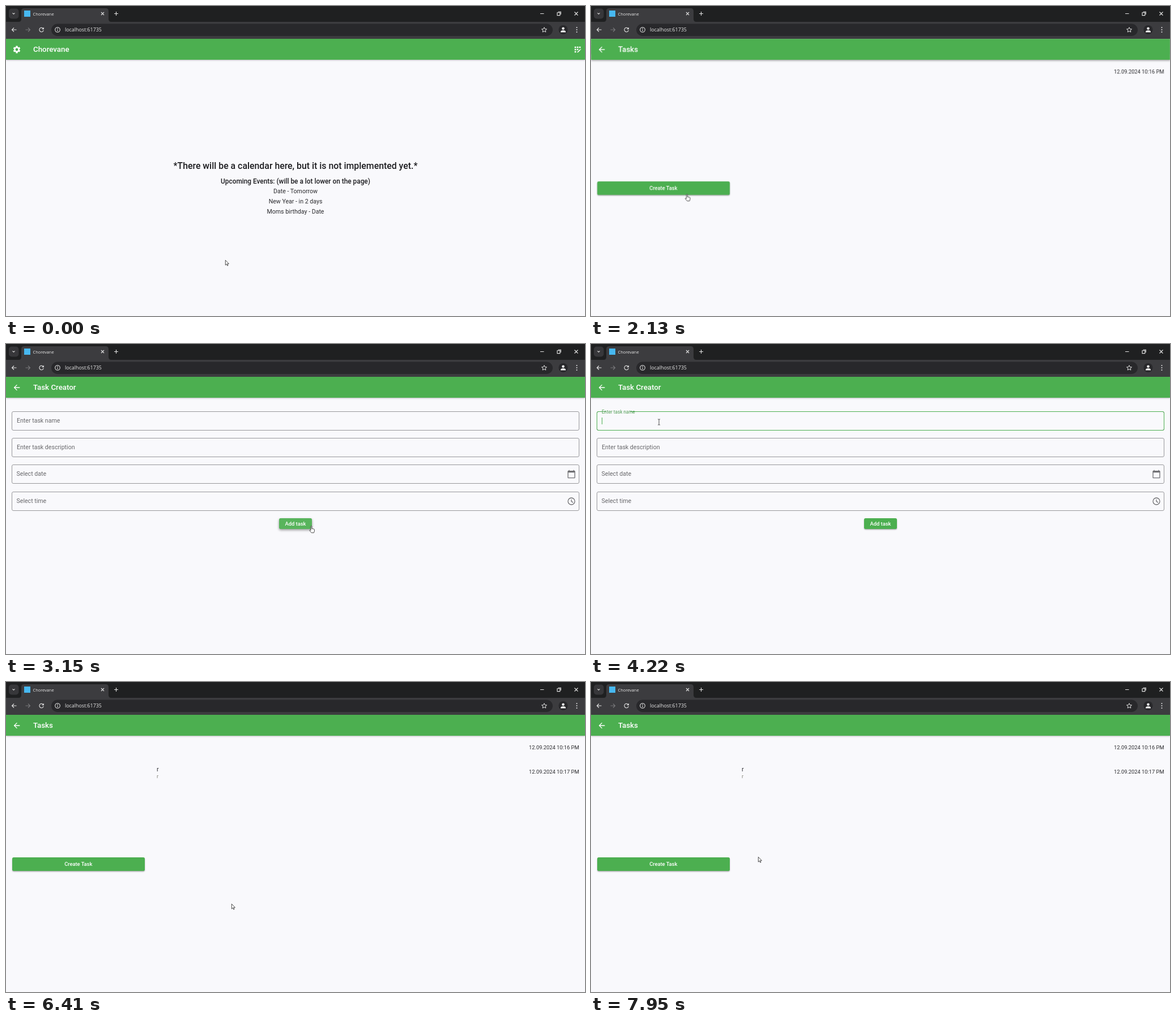
An HTML page for the animation above (7990 ms loop, 1022 by 548 pixels).

```html
<!DOCTYPE html>
<html lang="en">
<head>
<meta charset="utf-8">
<title>Chorevane</title>
<style>
:root { --page: #f9f9fc; --green: #4caf50; }
html, body { margin: 0; width: 100%; height: 100%; overflow: hidden; background: var(--page); }
body { position: relative; font: 10.6px Roboto, sans-serif; color: #2b2b2e; }
body *, .field::after { position: absolute; box-sizing: border-box; margin: 0; white-space: nowrap; }
svg, svg * { position: static; }
svg { position: absolute; overflow: visible; }

/* Every moving part shares one clock */
.move { animation: 7990ms linear infinite both; }
.step { animation: 7990ms step-end infinite both; }

.chrome { left: 0; top: 0; }
.view { left: 0; top: 58px; width: 1022px; height: 490px; overflow: hidden; }
.page, .scrim { inset: 0; }
.page { background: var(--page); }
.scrim { background: #000; opacity: 0; }

header { left: 0; top: 0; width: 100%; height: 37px; overflow: hidden; background: var(--green);
  color: #fff; box-shadow: 0 1.3px 3px #0005; }
header h1 { left: 48px; top: 0; font-size: 13.33px; font-weight: 500; line-height: 37px; }
.icon { width: 16px; height: 16px; fill: currentColor; }
header .icon { top: 11px; }
.lead { left: 10.5px; }
.grid { left: 1000.5px; }
.ripple { left: 985px; top: -4px; width: 46px; height: 46px; border-radius: 50%; background: #fff; }

.line { left: 0; width: 100%; line-height: 20px; text-align: center; }
.big { top: 215px; font-size: 15.85px; font-weight: 500; color: #1d1d20; }
.mid { top: 242px; font-size: 11.85px; font-weight: 500; color: #1d1d20; }
.date { right: 10.5px; font-size: 9.3px; line-height: 14px; }
.button { border-radius: 2.7px; background: var(--green); color: #fff; font-size: 9.33px; font-weight: 500;
  text-align: center; box-shadow: 0 1.3px 2px #0005; }
.create { left: 10.5px; top: 252px; width: 234.5px; height: 24px; line-height: 24px; }
.add { left: 482px; top: 250px; width: 58px; height: 19px; line-height: 19px; }
.note { left: 266px; line-height: 14px; }

.field { left: 10px; width: 1002px; height: 34px; line-height: 34px; }
.field::after { content: ""; inset: 0; border: 1px solid #98989b; border-radius: 3px; }
.focus { inset: 0; z-index: 1; border: 1.6px solid var(--green); border-radius: 3px; }
.notch { left: 6px; top: 0; height: 2px; z-index: 2; background: var(--page); }
.label { left: 8.5px; top: 0; z-index: 3; color: #68686b; transform-origin: 0 50%; }
.typed { left: 8.5px; top: 1px; color: #1d1d20; }
.caret { left: 8.5px; top: 11px; width: 1.3px; height: 12px; background: var(--green); }
.field .icon { left: 980px; top: 9px; color: #707073; }

.cursor { left: 0; top: 0; }
.cursor svg { left: 0; top: 0; fill: #fff; stroke: #222; stroke-width: .8; }

/* Page transitions */
.home { animation-name: home; }
.tasks { animation-name: tasks, tasksFade; }
.maker { animation-name: maker, makerFade; }
.scrim1 { animation-name: scrim1; }
.scrim2 { animation-name: scrim2; }
@keyframes home {
  0%, 15.907% { transform: scale(1); animation-timing-function: cubic-bezier(.05, 0, .1333, .06); }
  16.533% { transform: scale(1.02); animation-timing-function: cubic-bezier(.2083, .82, .25, 1); }
  19.662%, 100% { transform: scale(1.05); }
}
@keyframes tasks {
  0%, 15.907% { transform: scale(.85); animation-timing-function: cubic-bezier(.05, 0, .1333, .06); }
  16.533% { transform: scale(.91); animation-timing-function: cubic-bezier(.2083, .82, .25, 1); }
  19.662% { transform: scale(1); }
  31.79% { transform: scale(1); animation-timing-function: cubic-bezier(.05, 0, .1333, .06); }
  32.416% { transform: scale(1.02); animation-timing-function: cubic-bezier(.2083, .82, .25, 1); }
  35.544%, 72.58% { transform: scale(1.05); }
  72.591% { transform: scale(1.1); animation-timing-function: cubic-bezier(.05, 0, .1333, .06); }
  73.217% { transform: scale(1.06); animation-timing-function: cubic-bezier(.2083, .82, .25, 1); }
  76.345%, 100% { transform: scale(1); }
}
@keyframes tasksFade { 0%, 16.377% { opacity: 0; } 16.846%, 100% { opacity: 1; } }
@keyframes maker {
  0%, 31.79% { transform: scale(.85); animation-timing-function: cubic-bezier(.05, 0, .1333, .06); }
  32.416% { transform: scale(.91); animation-timing-function: cubic-bezier(.2083, .82, .25, 1); }
  35.544% { transform: scale(1); }
  72.591% { transform: scale(1); animation-timing-function: cubic-bezier(.05, 0, .1333, .06); }
  73.217% { transform: scale(.96); animation-timing-function: cubic-bezier(.2083, .82, .25, 1); }
  76.345%, 100% { transform: scale(.9); }
}
@keyframes makerFade {
  0%, 32.259% { opacity: 0; }
  32.728%, 72.901% { opacity: 1; }
  73.37%, 100% { opacity: 0; }
}
@keyframes scrim1 { 0%, 16.687% { opacity: 0; } 17.475%, 19.66% { opacity: .6; } 19.67%, 100% { opacity: 0; } }
@keyframes scrim2 { 0%, 32.569% { opacity: 0; } 33.354%, 35.54% { opacity: .6; } 35.55%, 100% { opacity: 0; } }

/* Buttons and list */
.ripple { animation-name: ripple; }
.add { animation-name: hover; }
.added { animation-name: added; }
@keyframes ripple {
  0%, 12.6% { opacity: 0; transform: scale(.58); }
  13.2%, 14.8% { opacity: .08; transform: scale(.58); }
  16.4%, 100% { opacity: .14; transform: scale(1); }
}
@keyframes hover {
  0%, 38.8%, 43.2%, 67.8%, 100% { background-color: #4caf50; box-shadow: 0 1.3px 2px #0005; }
  39.3%, 42.7%, 68.4%, 74% { background-color: #58b45c; box-shadow: 0 2px 4px #0006; }
}
@keyframes added { 0% { opacity: 0; } 72.5%, 100% { opacity: 1; } }

/* Form entry */
.name .label { animation-name: nameLabel; }
.name .notch { width: 63px; animation-name: nameNotch; }
.name .focus { animation-name: nameFocus; }
.name .typed { animation-name: nameTyped; }
.name .caret { animation-name: nameCaret; }
.info .label { animation-name: infoLabel; }
.info .notch { width: 83px; animation-name: infoNotch; }
.info .focus { animation-name: infoFocus; }
.info .typed { animation-name: infoTyped; }
.info .caret { animation-name: infoCaret; }
@keyframes nameLabel {
  0%, 51.4% { transform: none; color: #68686b; animation-timing-function: cubic-bezier(.4, 0, .2, 1); }
  53.5%, 100% { transform: translateY(-16.5px) scale(.75); color: #4c9f50; }
}
@keyframes infoLabel {
  0%, 59.07% { transform: none; color: #68686b; animation-timing-function: cubic-bezier(.4, 0, .2, 1); }
  61.16%, 100% { transform: translateY(-16.5px) scale(.75); color: #3f9f44; }
}
@keyframes nameNotch { 0%, 51.4% { transform: scaleX(0); } 53.5%, 100% { transform: none; } }
@keyframes infoNotch { 0%, 59.07% { transform: scaleX(0); } 61.16%, 100% { transform: none; } }
@keyframes nameFocus { 0% { opacity: 0; } 51.4% { opacity: 1; } 59.07%, 100% { opacity: 0; } }
@keyframes infoFocus { 0% { opacity: 0; } 59.07%, 100% { opacity: 1; } }
@keyframes nameTyped { 0% { opacity: 0; } 55%, 100% { opacity: 1; } }
@keyframes infoTyped { 0% { opacity: 0; } 61.6%, 100% { opacity: 1; } }
@keyframes nameCaret {
  0% { opacity: 0; transform: none; }
  51.4% { opacity: 1; transform: none; }
  55% { opacity: 1; transform: translateX(4px); }
  59.07%, 100% { opacity: 0; transform: translateX(4px); }
}
@keyframes infoCaret {
  0% { opacity: 0; transform: none; }
  59.07% { opacity: 1; transform: none; }
  61.6% { opacity: 1; transform: translateX(4px); }
  67.86%, 100% { opacity: 0; transform: translateX(4px); }
}

/* Pointer */
.cursor.move { animation-name: path; animation-timing-function: ease-in-out; }
.arrow { animation-name: arrow; }
.hand { animation-name: hand; }
.beam { animation-name: beam; }
@keyframes path {
  0%, 4.4% { transform: translate(387px, 449px); }
  13.1% { transform: translate(1000px, 84px); }
  15.9%, 20.7% { transform: translate(997px, 82px); }
  26.16%, 35.8% { transform: translate(169.5px, 333px); }
  39.2%, 42.55% { transform: translate(539px, 322px); }
  50.7%, 57% { transform: translate(120px, 138px); }
  58.8%, 62.3% { transform: translate(130px, 185px); }
  68.8%, 73.8% { transform: translate(518.5px, 322.5px); }
  79.8%, 82.6% { transform: translate(398px, 392px); }
  87% { transform: translate(330px, 468px); }
  92.9% { transform: translate(310px, 330px); }
  96.4%, 100% { transform: translate(295px, 309px); }
}
@keyframes arrow {
  0%, 15.95%, 32.5%, 42.8%, 66.5%, 73.3%, 100% { opacity: 1; }
  12.6%, 26%, 39%, 44%, 68% { opacity: 0; }
}
@keyframes hand {
  0%, 15.95%, 32.5%, 42.8%, 73.3%, 100% { opacity: 0; }
  12.6%, 26%, 39%, 68% { opacity: 1; }
}
@keyframes beam { 0%, 66.5%, 100% { opacity: 0; } 44% { opacity: 1; } }
</style>
</head>
<body>

<svg width="0" height="0">
  <symbol id="back" viewBox="0 0 24 24"><path d="M20 11H7.83l5.59-5.59L12 4l-8 8 8 8 1.41-1.41L7.83 13H20z"/></symbol>
</svg>

<div class="view">
  <section class="page home move">
    <header>
      <i class="ripple move"></i>
      <svg class="icon lead" viewBox="0 0 24 24"><path d="M19.14 12.94c.04-.3.06-.61.06-.94 0-.32-.02-.64-.07-.94l2.03-1.58c.18-.14.23-.41.12-.61l-1.92-3.32c-.12-.22-.37-.29-.59-.22l-2.39.96c-.5-.38-1.03-.7-1.62-.94l-.36-2.54c-.04-.24-.24-.41-.48-.41h-3.84c-.24 0-.43.17-.47.41l-.36 2.54c-.59.24-1.13.57-1.62.94l-2.39-.96c-.22-.08-.47 0-.59.22L2.74 8.87c-.12.21-.08.47.12.61l2.03 1.58a6 6 0 0 0 0 1.88l-2.03 1.58c-.18.14-.23.41-.12.61l1.92 3.32c.12.22.37.29.59.22l2.39-.96c.5.38 1.03.7 1.62.94l.36 2.54c.05.24.24.41.48.41h3.84c.24 0 .44-.17.47-.41l.36-2.54c.59-.24 1.13-.56 1.62-.94l2.39.96c.22.08.47 0 .59-.22l1.92-3.32c.12-.22.07-.47-.12-.61zM12 15.6a3.6 3.6 0 1 1 0-7.2 3.6 3.6 0 0 1 0 7.2z"/></svg>
      <h1>Chorevane</h1>
      <svg class="icon grid" viewBox="0 0 24 24"><path d="M10 4h4v4h-4zM4 16h4v4H4zM4 10h4v4H4zM4 4h4v4H4zM16 4h4v4h-4zM14 12.42V10h-4v4h2.42zM20.88 11.29l-1.17-1.17q-.29-.24-.58 0l-.88.88L20 12.75l.88-.88q.24-.29 0-.58zM11 18.25V20h1.75l6.67-6.67-1.75-1.75z"/></svg>
    </header>
    <p class="line big">*There will be a calendar here, but it is not implemented yet.*</p>
    <p class="line mid">Upcoming Events: (will be a lot lower on the page)</p>
    <p class="line" style="top:260px">Date - Tomorrow</p>
    <p class="line" style="top:278px">New Year - in 2 days</p>
    <p class="line" style="top:296px">Moms birthday - Date</p>
  </section>

  <div class="scrim scrim1 move"></div>
  <section class="page tasks move">
    <header>
      <svg class="icon lead"><use href="#back"/></svg>
      <h1>Tasks</h1>
    </header>
    <p class="date" style="top:51px">12.09.2024 10:16 PM</p>
    <div class="added step" style="inset:0">
      <p class="note" style="top:90px">r</p>
      <p class="note" style="top:102px;font-size:9.3px;color:#808078">r</p>
      <p class="date" style="top:94px">12.09.2024 10:17 PM</p>
    </div>
    <div class="button create">Create Task</div>
  </section>

  <div class="scrim scrim2 move"></div>
  <section class="page maker move">
    <header>
      <svg class="icon lead"><use href="#back"/></svg>
      <h1>Task Creator</h1>
    </header>
    <div class="field name" style="top:61px">
      <i class="focus step"></i><i class="notch move"></i>
      <span class="label move">Enter task name</span>
      <span class="typed step">r</span><i class="caret step"></i>
    </div>
    <div class="field info" style="top:108px">
      <i class="focus step"></i><i class="notch move"></i>
      <span class="label move">Enter task description</span>
      <span class="typed step">r</span><i class="caret step"></i>
    </div>
    <div class="field" style="top:155px">
      <span class="label">Select date</span>
      <svg class="icon" viewBox="0 0 24 24"><path d="M20 3h-1V1h-2v2H7V1H5v2H4c-1.1 0-2 .9-2 2v16c0 1.1.9 2 2 2h16c1.1 0 2-.9 2-2V5c0-1.1-.9-2-2-2zm0 18H4V8h16z"/></svg>
    </div>
    <div class="field" style="top:203px">
      <span class="label">Select time</span>
      <svg class="icon" viewBox="0 0 24 24"><path d="M12 7v5.5l4.5 2.7M21 12a9 9 0 1 1-18 0 9 9 0 0 1 18 0z" fill="none" stroke="currentColor" stroke-width="1.9"/></svg>
    </div>
    <div class="button add move">Add task</div>
  </section>
</div>

<svg class="chrome" width="1022" height="58" fill="none" stroke="#e3e3e3" stroke-width="1.1" font-family="'Open Sans', sans-serif">
  <g stroke="none">
    <path fill="#1f2021" d="M0 0h1022v58H0z"/>
    <path fill="#3c3c3f" d="M0 28h22q5 0 5-5V9q0-5 5-5h144q5 0 5 5v14q0 5 5 5h836v30H0z"/>
    <rect fill="#37373a" x="5" y="4.500" width="17.500" height="18" rx="5"/>
    <rect fill="#28282b" x="80" y="31.500" width="885" height="21.500" rx="10.750"/>
    <rect fill="#47b8f0" x="32" y="8" width="11" height="11"/>
    <g fill="#e8e8e8">
      <text x="47.500" y="16.500" font-size="7.400">Chorevane</text>
      <text x="104" y="45.300" font-size="8.900">localhost:61735</text>
      <circle cx="91" cy="39.700" r=".8"/>
      <circle cx="1007.500" cy="38" r="1"/><circle cx="1007.500" cy="42" r="1"/><circle cx="1007.500" cy="46" r="1"/>
    </g>
    <circle fill="#28282b" cx="983.500" cy="42" r="8"/>
    <path fill="#f2f2f2" d="M979 46.500v-1q0-2.500 4.500-2.500t4.500 2.500v1z"/>
    <circle fill="#f2f2f2" cx="983.500" cy="39.800" r="2.300"/>
  </g>
  <path d="M11.500 12.300l2 2 2-2M168 11l5 5m0-5l-5 5M191 13.500h7m-3.500-3.500v7M943 13.500h6.500M1003.500 10.500l6 6m0-6l-6 6M973 11.800h4.800v4.800H973zM974.500 10.300h4.800v4.800"/>
  <path d="M18.500 42h-8m3.500-3.500L10.500 42l3.500 3.500M65.800 40.200a3.700 3.700 0 1 0 .4 2.600M66.300 38v2.700h-2.700M91 41.500v3"/>
  <path stroke="#77777a" d="M34.500 42h8M39 38.500l3.500 3.500-3.500 3.500"/>
  <circle cx="91" cy="42" r="4.300"/>
  <path stroke-width="1" d="M950 37.700l1.300 2.900 3.200.3-2.400 2.100.7 3.100-2.800-1.600-2.800 1.600.7-3.100-2.400-2.100 3.200-.3z"/>
</svg>

<div class="cursor move">
  <svg class="arrow step" width="8" height="12"><path d="M.3.3v8.800l2-1.900 1.400 3 1.300-.6-1.300-2.900h2.700z"/></svg>
  <svg class="hand step" width="10" height="13"><path d="M-1 7V.6q0-1 .9-1t.9 1v3.800l3.700.8q1.200.3 1 1.600L5 10.200 4.400 11.700H.2L-2.900 8q-.6-1 .3-1.400.7-.2 1.600.9z"/></svg>
  <svg class="beam step" width="6" height="12"><path fill="none" d="M-2-5h1.500L0-4.500.5-5H2M0-4.500v9M-2 5h1.500L0 4.500.5 5H2"/></svg>
</div>

</body>
</html>
```
